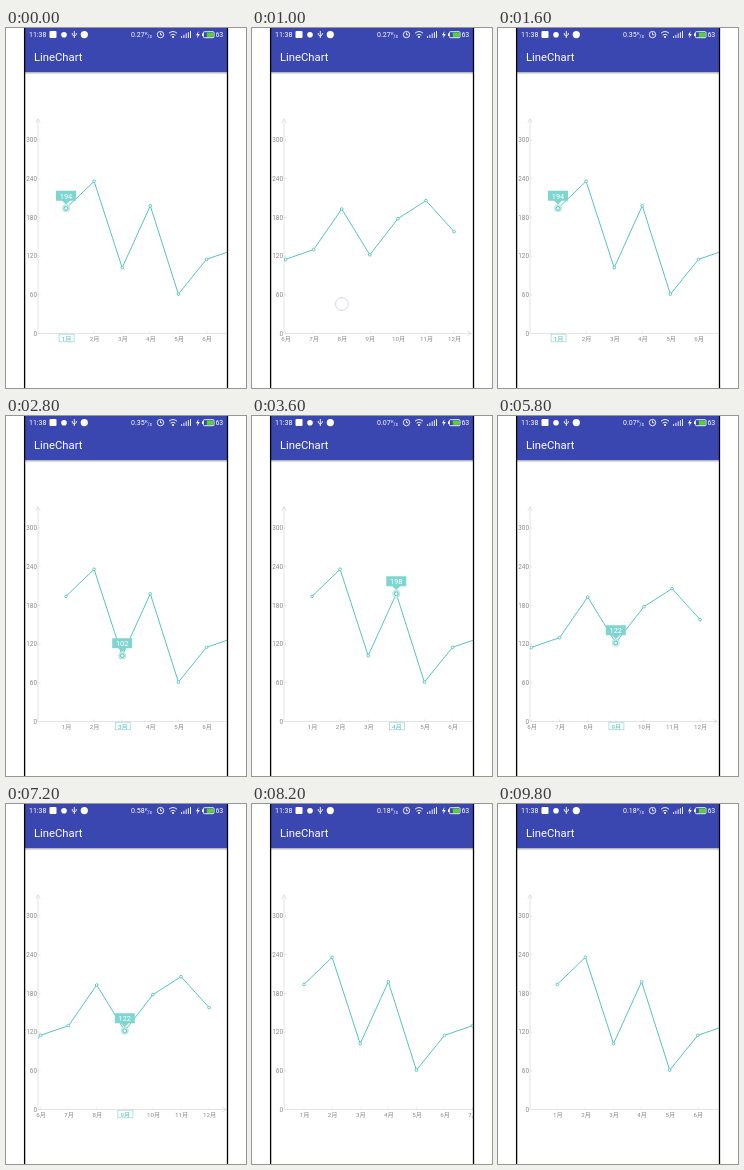
Write an HTML page that moves like this. It is 240x360 px and loops after 10000 ms.

```html
<!DOCTYPE html>
<html lang="en">
<head>
<meta charset="utf-8">
<title>LineChart</title>
<style>
html, body { margin: 0; width: 100%; height: 100%; overflow: hidden; background: #fff; }
svg { display: block; width: 100%; height: 100%; }
text { font-family: Roboto, "Noto Sans CJK SC", "Noto Sans CJK", sans-serif; }
.bar text { fill: #fff; font-size: 7px; }
.bar .title { font-size: 11.27px; }
.axis { fill: none; stroke: #dedede; stroke-width: .8; }
.lab { fill: #8a8a8a; font-size: 6.4px; }
.month { text-anchor: middle; font-size: 6.2px; }
.lab.on { fill: #45bdb6; }
.line { fill: none; stroke: #55c5bf; stroke-width: 1; stroke-linejoin: round; }
.dot { fill: #fff; stroke: #55c5bf; stroke-width: .9; }
.tip { fill: #7fd5d0; }
.tip-text { fill: #fff; font-size: 7.4px; text-anchor: middle; }
.box { fill: none; stroke: #8edad6; stroke-width: .7; }
.touch { fill: #fff; fill-opacity: .7; stroke: #cdd0e4; stroke-width: .9; }
.glyph { fill: none; stroke: #fff; stroke-width: .9; }
</style>
</head>
<body>
<svg viewBox="0 0 240 360" preserveAspectRatio="none">
  <defs>
    <clipPath id="plot"><rect x="32" y="46" width="189" height="262"/></clipPath>
    <clipPath id="months"><rect x="24" y="303" width="197" height="20"/></clipPath>
    <linearGradient id="shade" x1="0" y1="0" x2="0" y2="1">
      <stop offset="0" stop-color="#a9a9b4"/><stop offset="1" stop-color="#fff"/>
    </linearGradient>
  </defs>
  <rect width="240" height="360" fill="#fff"/>
  <rect x="19" y="44" width="202" height="2.6" fill="url(#shade)"/>

  <g id="yaxis" class="axis"><path d="M32 305.5V91M29.7 95L32 90.5L34.3 95"/></g>
  <g id="ylabels"></g>
  <g clip-path="url(#plot)"><g id="chart"></g></g>
  <g clip-path="url(#months)"><g id="names"></g></g>

  <g class="bar">
    <rect x="19" width="202" height="44" fill="#3b47b0"/>
    <text class="title" x="28" y="33">LineChart</text>
    <text x="23" y="9.2">11:38</text>
    <rect x="43.5" y="3" width="7" height="7" rx="1" fill="#fff"/>
    <circle cx="58" cy="6.7" r="2.8" fill="#fff"/>
    <path class="glyph" stroke-width=".7" d="M68.3 3V10M66.3 5V6.8L68.3 8.2L70.3 6.6V5"/>
    <circle cx="78.3" cy="6.6" r="3.6" fill="#fff"/>
    <text id="speed" x="125" y="9.2"></text>
    <text x="139" y="7" style="font-size:4.4px">K</text>
    <text x="141.6" y="9.6" style="font-size:4.8px">/s</text>
    <circle class="glyph" cx="154.5" cy="6.6" r="3.2"/>
    <path class="glyph" d="M154.5 4.6V6.8H156.2"/>
    <path class="glyph" d="M163 5.2Q167 1.8 171 5.2M164.6 7.2Q167 5.2 169.4 7.2"/>
    <circle cx="167" cy="9" r="1.1" fill="#fff"/>
    <path class="glyph" d="M175.6 10V8M177.9 10V6.8M180.2 10V5.4M182.4 10V4.2M184.5 10V3"/>
    <path fill="#fff" d="M192.6 3L190 7.2H191.7L191 10.2L193.8 6H192Z"/>
    <rect class="glyph" x="197.4" y="3.7" width="10.6" height="6" rx="1"/>
    <rect x="196" y="5.4" width="1.2" height="2.6" fill="#fff"/>
    <rect x="200.8" y="4.6" width="6.5" height="4.3" fill="#55d42c"/>
    <text x="209.4" y="9.2">63</text>
  </g>
  <path d="M18.6 0V360M221.5 0V360" stroke="#000" stroke-width="1.3"/>
  <circle id="touch" class="touch" r="6.4"/>
</svg>
<script>
const NS = 'http://www.w3.org/2000/svg';
const STEP = 200, STEPS = 50;
const values = [194, 236, 102, 198, 61, 115, 130, 193, 122, 178, 206, 158];
const byId = id => document.getElementById(id);
const px = i => 60 + i * 28.1;
const py = v => 305.5 - v * 0.645;

function add(parent, tag, attrs, text) {
  const el = document.createElementNS(NS, tag);
  for (const k in attrs) el.setAttribute(k, attrs[k]);
  if (text !== undefined) el.textContent = text;
  parent.appendChild(el);
  return el;
}

const chart = byId('chart'), names = byId('names');
for (let v = 0; v <= 300; v += 60) {
  add(byId('ylabels'), 'text', { class: 'lab', x: 31, y: py(v) + 2.3, 'text-anchor': 'end' }, v);
  if (v) add(byId('yaxis'), 'path', { d: `M32 ${py(v)}h2.5` });
}
add(chart, 'path', { class: 'axis', d: 'M32 305.5H386M382 303.2L386.5 305.5L382 307.8' });
add(chart, 'polyline', { class: 'line', points: values.map((v, i) => px(i) + ',' + py(v)).join(' ') });
const halo = add(chart, 'circle', { r: 4, fill: '#bde9e6' });
const months = values.map((v, i) => {
  add(chart, 'path', { class: 'axis', d: `M${px(i)} 305.5v-2` });
  add(chart, 'circle', { class: 'dot', cx: px(i), cy: py(v), r: 1.35 });
  return add(names, 'text', { class: 'lab month', x: px(i) + .6, y: 312.5 }, i + 1 + '月');
});
const ring = add(chart, 'circle', { class: 'dot', r: 1.8, 'stroke-width': 1.3 });
const tip = add(chart, 'g', {});
add(tip, 'path', { class: 'tip', d: 'M-10-17.5H10V-7.5H4L0-3.8L-4-7.5H-10Z' });
const tipText = add(tip, 'text', { class: 'tip-text', y: -9.8 });
const box = add(names, 'rect', { class: 'box', y: 306.2, width: 15, height: 7.6 });

// [first step, value], held until the next entry
const scrolls = [[0, 0], [2, -70], [3, -145], [4, -167], [6, -95], [7, -20], [8, 0],
  [25, -90], [26, -167], [35, -166], [39, -95], [40, -40], [41, -8], [42, 0],
  [44, -.3], [45, -.5], [46, -.7]];
const picks = [[0, 0], [10, 1], [13, 2], [16, 3], [21, 0], [28, 8], [31, 10], [35, 8]];
const speeds = [[0, '0.27'], [8, '0.35'], [18, '0.07'], [34, '0.58'], [40, '0.18']];
// [first step, steps, x, y, dx per step]
const touches = [[1, 1, 195, 260, 0], [5, 2, 90, 276, 72], [9, 2, 88, 154, 0],
  [12, 2, 116, 240, 0], [15, 2, 144, 179, 0], [20, 2, 60, 313, 0],
  [24, 2, 195, 257, -90], [27, 2, 118, 227, 0], [30, 2, 176, 172, 0],
  [34, 2, 119, 312, 0], [38, 2, 90, 270, 71]];
const at = (list, n) => list.filter(e => e[0] <= n).pop()[1];

function draw(n) {
  const shift = `translate(${at(scrolls, n)} 0)`;
  chart.setAttribute('transform', shift);
  names.setAttribute('transform', shift);

  const k = at(picks, n), x = px(k), y = py(values[k]);
  for (const c of [halo, ring]) {
    c.setAttribute('cx', x);
    c.setAttribute('cy', y);
  }
  tip.setAttribute('transform', `translate(${x} ${y})`);
  tipText.textContent = values[k];
  box.setAttribute('x', x - 6.9);
  months.forEach((m, i) => m.classList.toggle('on', i === k));

  byId('speed').textContent = at(speeds, n);
  const t = touches.find(t => n >= t[0] && n < t[0] + t[1]);
  const finger = byId('touch');
  finger.style.display = t ? '' : 'none';
  if (t) {
    finger.setAttribute('cx', t[2] + (n - t[0]) * t[4]);
    finger.setAttribute('cy', t[3]);
  }
}

let last = -1;
function tick() {
  const n = Math.floor(performance.now() / STEP) % STEPS;
  if (n !== last) draw(last = n);
  requestAnimationFrame(tick);
}
tick();
</script>
</body>
</html>
```
